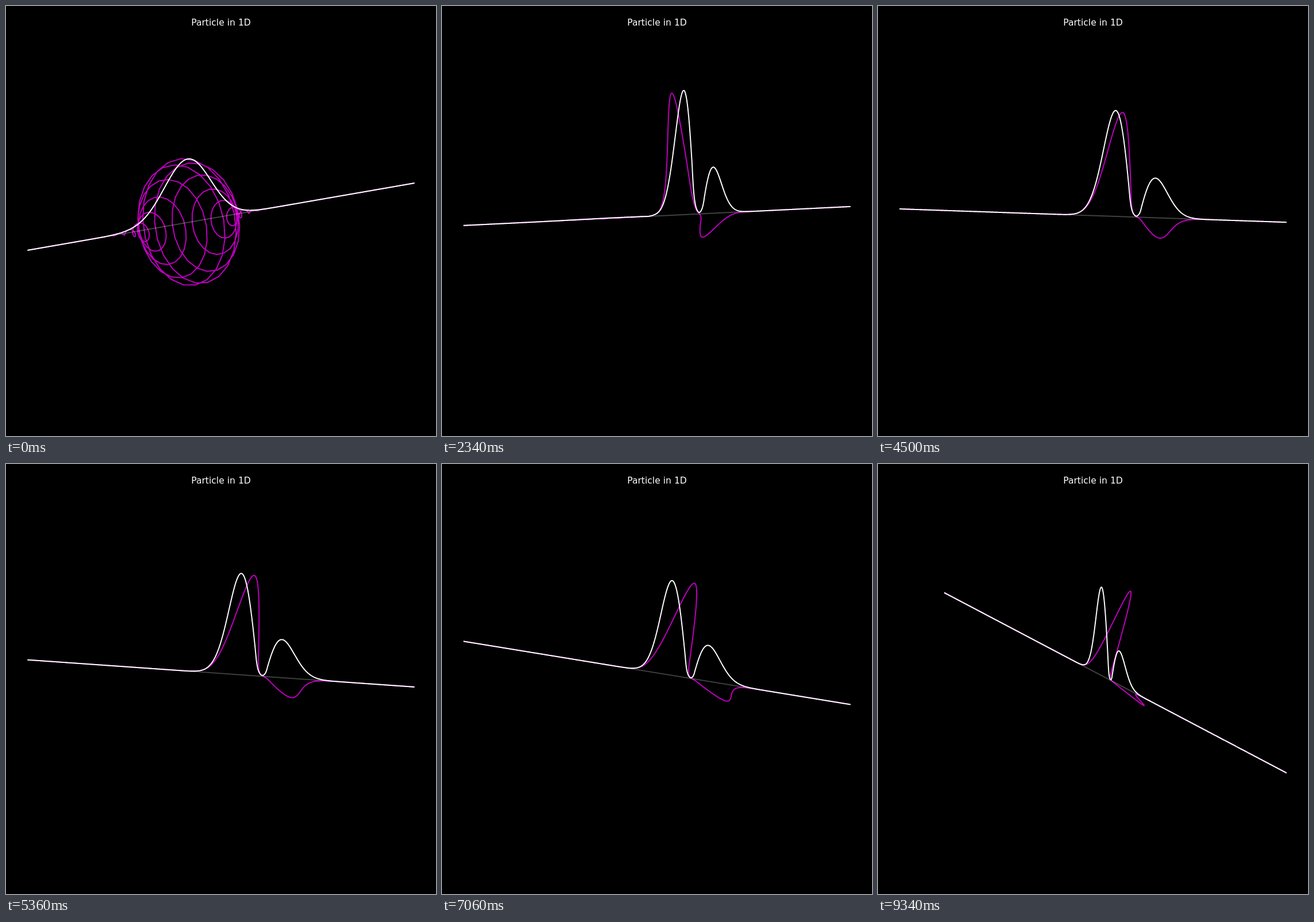
Recreate the animation shown at these times as an HTML page with a canvas. Size 748 by 748 pixels, loop 9.36 s.

```html
<!DOCTYPE html>
<html>
<head>
<meta charset="utf-8">
<style>
  html, body { margin: 0; width: 100%; height: 100%; overflow: hidden; background: #000; }
  canvas { display: block; width: 748px; height: 748px; }
</style>
</head>
<body>
<canvas id="stage" width="748" height="748"></canvas>
<script>
const ctx = document.getElementById('stage').getContext('2d');
const STEP = 20, FRAMES = 468;
const POINTS = 2048, REACH = 3.013;
const ELEV = 10 * Math.PI / 180, SE = Math.sin(ELEV), CE = Math.cos(ELEV);

// Wave packet, barrier and the parts that gather on either side of it
const X0 = -0.2535, K0 = 100.5, VAR0 = 0.0227, NORM = 0.0279, DIFFUSION = 0.00137;
const EDGE_L = 0.15, EDGE_R = 0.21, SKIN = 0.0125, KAPPA = 100;
const PHASE_L = 20 * Math.PI / 180, PHASE_R = 131 * Math.PI / 180, RATIO = 0.375;

// Camera orbiting at fixed elevation, with perspective
function camera(frame) {
  const turn = (-45 + 0.25 * frame) * Math.PI / 180;
  const s = Math.sin(turn), c = Math.cos(turn);
  return (x, y, z) => {
    const f = 3639 / (10 - CE * (x * s - y * c) - SE * z);
    return [383.1 + f * (x * c + y * s), 364.9 - f * (SE * (y * c - x * s) + CE * z)];
  };
}

// Half of a diffusing dipole: d is the distance outside the barrier edge
function lobe(d, s) {
  const v = (Math.max(d, 0) + SKIN) / s;
  return v * Math.exp((1 - v * v) / 2) * (d < 0 ? Math.exp(KAPPA * d) : 1);
}

// Complex wave in imaginary time, kept at constant norm
function wave(t) {
  const tau = DIFFUSION * t, variance = VAR0 + tau;
  const s = Math.sqrt(tau), k = K0 * VAR0 / variance;
  const damp = u => K0 * K0 / 2 * VAR0 * u / (VAR0 + u);
  const ref = DIFFUSION * 1.04;
  const side = t ? 0.48 * ref / tau * Math.exp(damp(tau) - damp(ref)) : 0;
  const total = 1.772 * Math.sqrt(variance) + 1.2046 * s * side * side * (1 + RATIO * RATIO);
  const amp = t ? Math.sqrt(NORM / total) : 0.301;
  const cut = KAPPA * Math.min(1, 2 * t);
  return x => {
    const d = x - X0, phase = k * d + K0 * X0;
    const main = amp * Math.exp(-d * d / (2 * variance) - cut * Math.max(0, x - EDGE_L));
    const left = t ? amp * side * lobe(EDGE_L - x, s) : 0;
    const right = t ? amp * side * RATIO * lobe(x - EDGE_R, s) : 0;
    return [
      main * Math.cos(phase) + left * Math.cos(PHASE_L) + right * Math.cos(PHASE_R),
      -main * Math.sin(phase) + left * Math.sin(PHASE_L) + right * Math.sin(PHASE_R)
    ];
  };
}

function stroke(points, color) {
  ctx.strokeStyle = color;
  ctx.beginPath();
  for (const p of points) ctx.lineTo(p[0], p[1]);
  ctx.stroke();
}

function draw(frame) {
  const project = camera(frame), psi = wave(frame * STEP / 1000);
  const helix = [], envelope = [];
  for (let i = 0; i < POINTS; i++) {
    const x = REACH * (2 * i / (POINTS - 1) - 1);
    const [re, im] = psi(x);
    helix.push(project(x, im, re));
    envelope.push(project(x, 0, Math.hypot(re, im)));
  }
  ctx.fillStyle = '#000';
  ctx.fillRect(0, 0, 748, 748);
  ctx.fillStyle = '#fff';
  ctx.font = '15.58px "DejaVu Sans", sans-serif';
  ctx.textAlign = 'center';
  ctx.fillText('Particle in 1D', 374, 34);

  ctx.save();
  ctx.beginPath();
  ctx.rect(37.4, 37.4, 673.2, 673.2);
  ctx.clip();
  ctx.lineWidth = 1.95;
  ctx.lineJoin = 'round';
  stroke(helix, '#bf00bf');
  stroke([project(-REACH, 0, 0), project(REACH, 0, 0)], 'rgba(255,255,255,0.25)');
  stroke(envelope, '#fff');
  ctx.restore();
}

const start = performance.now();
function tick() {
  draw(Math.floor((performance.now() - start) / STEP) % FRAMES);
  requestAnimationFrame(tick);
}
tick();
</script>
</body>
</html>
```
